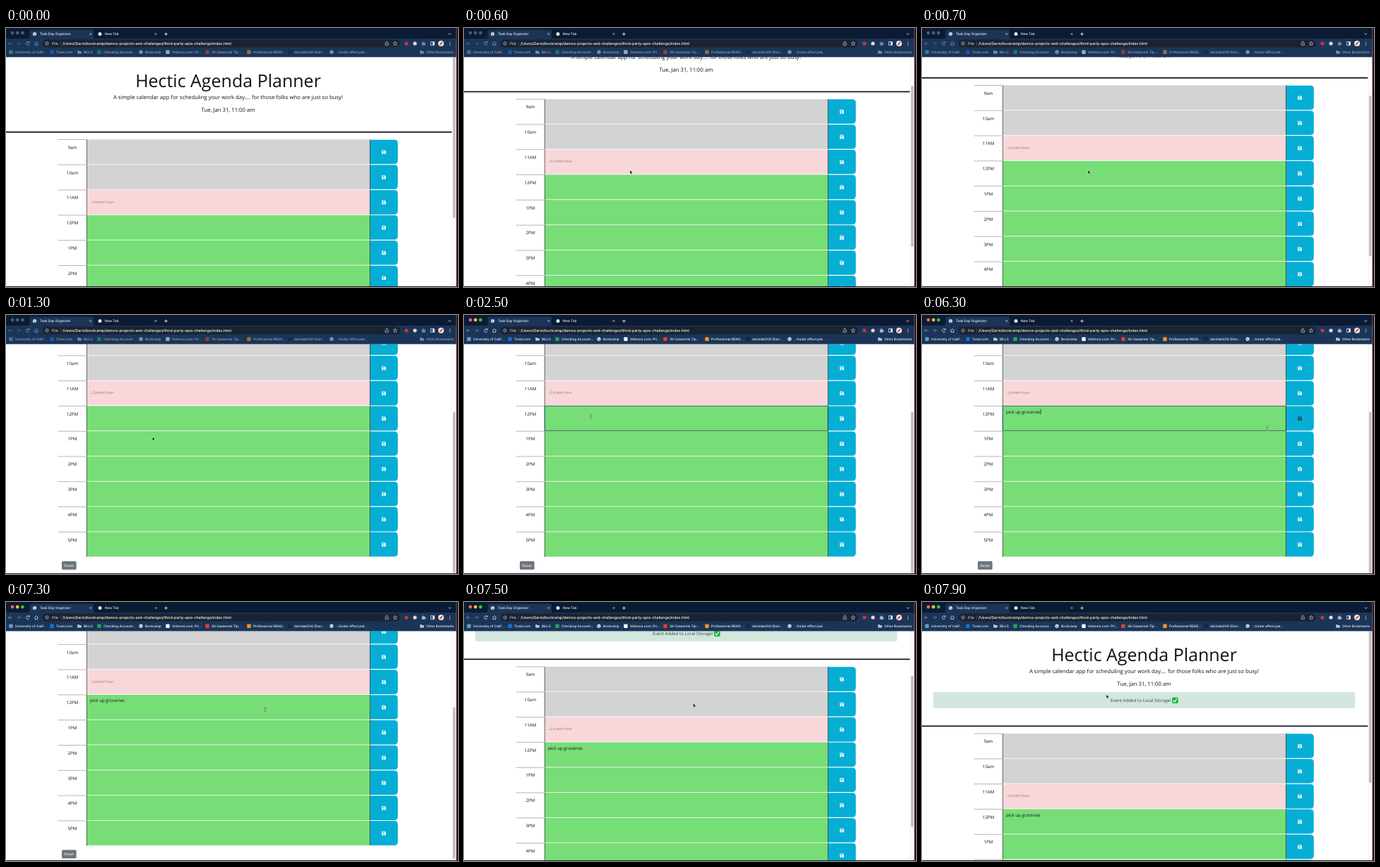
An HTML page for the animation above (8 s loop, 640 by 368 pixels).

```html
<!DOCTYPE html>
<html lang="en">
<head>
<meta charset="utf-8">
<title>Day planner</title>
<style>
  html, body { margin: 0; width: 100%; height: 100%; overflow: hidden; background: #fff; }
  svg { display: block; width: 640px; height: 368px; text-rendering: geometricPrecision; }
  .page text { font-family: "Open Sans", sans-serif; fill: #111; }
  .chrome text { font-family: Inter, Roboto, sans-serif; font-size: 4.7px; font-weight: 500; }
  .chrome .url { font-size: 5.25px; }
  .mid { text-anchor: middle; }
</style>
</head>
<body>
<svg id="stage" viewBox="0 0 640 368" xmlns="http://www.w3.org/2000/svg">
  <defs>
    <clipPath id="view"><rect y="41.3" width="637.6" height="325.7"/></clipPath>
  </defs>
</svg>
<script>
const NS = "http://www.w3.org/2000/svg";
const LOOP = 8000, VIEW_TOP = 41.5, VIEW_H = 325, MAX_SCROLL = 136.5;
const ROW_TOP = 158.2, ROW_H = 35.8, ALERT_H = 28.5;
const ACTIVATE_AT = 1800, FOCUS_AT = 2000, CLICK_AT = 6600;
const stage = document.getElementById("stage");

function add(parent, tag, attrs = {}, text) {
  const node = document.createElementNS(NS, tag);
  set(node, attrs);
  if (text !== undefined) node.textContent = text;
  return parent.appendChild(node);
}
function set(node, attrs) {
  for (const key in attrs) node.setAttribute(key, attrs[key]);
}
const show = (node, on) => set(node, { visibility: on ? "visible" : "hidden" });
const rect = (p, x, y, width, height, fill, more) =>
  add(p, "rect", { x, y, width, height, fill, ...more });
const dot = (p, cx, cy, r, fill, more) => add(p, "circle", { cx, cy, r, fill, ...more });
const shape = (p, d, fill, more) => add(p, "path", { d, fill, ...more });
const line = (p, d, stroke, width = 0.8, more) =>
  add(p, "path", { d, stroke, fill: "none", "stroke-width": width, ...more });
const label = (p, x, y, text, more) => add(p, "text", { x, y, ...more }, text);

// Page
const view = add(stage, "g", { "clip-path": "url(#view)", class: "page" });
rect(view, 0, 41, 638, 326, "#fff");
const page = add(view, "g");
label(page, 314.5, 84, "Hectic Agenda Planner", { class: "mid", "font-size": 25 });
label(page, 314.5, 101.2,
  "A simple calendar app for scheduling your work day.... for those folks who are just so busy!",
  { class: "mid", "font-size": 7.73 });
label(page, 314.5, 119, "Tue, Jan 31, 11:00 am", { class: "mid", "font-size": 7.73 });

const notice = add(page, "g");
rect(notice, 16.2, 128.4, 596.6, 22, "#d1e7dd", { stroke: "#badbcc", "stroke-width": 0.5, rx: 1.5 });
label(notice, 267, 142, "Event Added to Local Storage!", { "font-size": 6.2, style: "fill:#2b4a3c" });
rect(notice, 354.2, 135.6, 8.4, 8.4, "#17b53a", { rx: 1.4 });
line(notice, "M356 140l1.8 2 3-5", "#fff", 1.2);

const lower = add(page, "g");
rect(lower, 0, 147, 631.5, 1.7, "#111");

function saveIcon(parent, x, y) {
  const outline = "M-2.8-2.3q0-.5.5-.5H1.3L2.8-1.3V2.3q0 .5-.5.5H-2.3q-.5 0-.5-.5Z";
  const holes = "M-1.8-1.8V-.5H1V-1.8ZM0 .5a.8 .8 0 1 0 .01 0Z";
  return shape(parent, outline + holes, "#fff",
    { "fill-rule": "evenodd", transform: `translate(${x} ${y})` });
}
const hours = ["9am", "10am", "11AM", "12PM", "1PM", "2PM", "3PM", "4PM", "5PM"];
const rows = hours.map((hour, i) => {
  const row = add(lower, "g", { transform: `translate(0 ${ROW_TOP + i * ROW_H})` });
  const fill = i < 2 ? "#d3d3d3" : i === 2 ? "#f8d7da" : "#77dd77";
  line(row, "M74 .3H114", "#333", 0.6, { "stroke-dasharray": "1.2 .8" });
  label(row, 94, 13.6, hour, { class: "mid", "font-size": 6.2 });
  rect(row, 114, 0.2, 401.5, ROW_H - 0.8, fill);
  line(row, `M114.4 0V${ROW_H}`, "#333", 0.7);
  const button = shape(row, "M515.5 .5H549.8q5 0 5 5V30.1q0 5-5 5H515.5Z", "#06aed5",
    { "stroke-width": 0.6 });
  line(row, `M515.4 0V${ROW_H - 0.6}`, "#222", 0.7);
  return { row, button, icon: saveIcon(row, 535, 18) };
});
label(rows[2].row, 118.6, 18.9, "...Current hour",
  { "font-size": 5.3, "font-style": "italic", style: "fill:#94707a" });

const noon = rows[3];
const focusRing = add(noon.row, "g");
rect(focusRing, 114.5, 0.1, 400.8, ROW_H - 0.7, "none", { stroke: "#17453f", "stroke-width": 0.8 });
line(focusRing, `M113.9 0V${ROW_H - 0.6}`, "#5d9fd0", 0.7);
const entry = label(noon.row, 119, 10.6, "", { "font-size": 6.2 });
const caret = rect(noon.row, 119, 4.3, 0.6, 8, "#111");

rect(lower, 79, 486.3, 20.6, 12, "#6c757d", { rx: 1.6 });
label(lower, 89.3, 494.3, "Reset", { class: "mid", "font-size": 5.4, style: "fill:#fff" });

rect(view, 631.6, 41, 6, 326, "#fafafa");
line(view, "M631.7 41V367", "#e4e4e4", 0.4);
const thumb = rect(view, 633, 42, 3.2, 228, "#bdbdbd", { rx: 1.6 });

// Browser frame
const NAVY = "#1b3558", PALE = "#dce3ed", WHITE = "#f4f7fb";
const chrome = add(stage, "g", { class: "chrome" });
rect(chrome, 637.6, 0, 2.4, 368, "#35131f");
rect(chrome, 0, 367, 640, 1, "#1b1820");
rect(chrome, 0, 0, 637.6, 16, "#0b1b34");
rect(chrome, 0, 15, 637.6, 26.4, NAVY);
shape(chrome, "M31 15.2q2.5 0 2.5-2.5V4.6q0-2.2 2.2-2.2H121.8q2.2 0 2.2 2.2V12.7q0 2.5 2.5 2.5Z", NAVY);
const lights = ["#ff5f57", "#febc2e", "#28c840"].map((color, i) => ({
  color, node: dot(chrome, 9 + i * 7.2, 7, 2.4, color)
}));

const tools = add(chrome, "g", { fill: WHITE });
// These dim while the window is in the background
const bookmarkBar = add(chrome, "g", { fill: WHITE });
const navigation = add(chrome, "g");

function globe(parent, x, y) {
  dot(parent, x, y, 2.6, PALE);
  line(parent, `M${x - 1.8} ${y - 0.8}q1.6 0 1.8 1.4t1.6 .9`, "#43597a", 0.8);
}
function folder(parent, x, y) {
  shape(parent, `M${x - 2.8} ${y - 2.1}h2.1l.8.8h2.7v3.5h-5.6Z`, "#b9c5d6");
}
function cross(x, y) {
  line(tools, `M${x - 1.2} ${y - 1.2}l2.4 2.4m0-2.4l-2.4 2.4`, WHITE, 0.7);
}
globe(tools, 40.5, 8.5);
label(tools, 48, 10.1, "Task Day Organizer");
cross(119.7, 8.5);
dot(tools, 133, 8.5, 2.5, PALE);
label(tools, 140, 10.1, "New Tab");
cross(212, 8.5);
line(tools, "M226.5 6.2v4.8m-2.4-2.4h4.8", WHITE);
line(tools, "M626.5 7.6l1.8 1.8 1.8-1.8", WHITE);

line(navigation, "M8.5 22H3.6m2.3-2.3L3.6 22l2.3 2.3", "#8a99b0");
line(navigation, "M15.5 22h4.9m-2.3-2.3L20.4 22l-2.3 2.3", "#71829c");
line(navigation, "M32.7 20.6A2.3 2.3 0 1 0 33 23M33.2 19v2h-2", PALE);
line(navigation, "M40.3 22L43 19.6 45.7 22M41.2 21.8v2.7h3.6v-2.7", PALE);

rect(tools, 51.5, 16.6, 506.5, 10.9, "#1b2331", { rx: 5.4 });
dot(tools, 58, 22, 2.2, "none", { stroke: PALE, "stroke-width": 0.6 });
line(tools, "M58 21.7v1.4M58 20.5v.6", PALE, 0.6);
label(tools, 65, 23.9, "File", { class: "url", fill: "#c6d0de" });
line(tools, "M77.3 19.5v5", "#60718b", 0.5);
label(tools, 80, 23.9,
  "/Users/Darin/bootcamp/demos-projects-and-challenges/third-party-apis-challenge/index.html",
  { class: "url", fill: "#fff" });
line(tools, "M538 21.2h-1v3.3h4.4v-3.3h-1M539.2 23v-4m-1.2 1l1.2-1.2 1.2 1.2", PALE, 0.6);
line(tools, "M551 19.2l.8 1.9 2 .2-1.5 1.4.4 2-1.7-1-1.7 1 .4-2-1.5-1.4 2-.2Z", PALE, 0.6);

dot(tools, 567, 22, 2.6, "#d8322f");
dot(tools, 579, 22, 2.6, "#eed6d4");
shape(navigation, "M588.8 20.5h1.4q0-1.3.9-1.3t.9 1.3h1.4v1.3q1.3 0 1.3.9t-1.3.9v1.2h-4.6Z", "#a8b6c9");
rect(tools, 601.6, 19.7, 4.8, 4.6, "none", { stroke: WHITE, "stroke-width": 0.7 });
rect(tools, 604.2, 19.7, 2.2, 4.6, WHITE);
dot(tools, 616, 22, 4, "#f3eae7");
line(tools, "M614.3 24.2L617.8 19.8", "#d4503f", 2);
[-1.9, 0, 1.9].forEach(dy => dot(tools, 628.5, 22 + dy, 0.6, WHITE));

const bookmarks = [
  [7, "#5f9fc0", "University of Calif..."],
  [65, "#1c6fd0", "Toval.com"],
  [104, "folder", "BILLS"],
  [132, "#1fa463", "Checking Account..."],
  [191, "globe", "Bootcamp"],
  [229, "#f4f4f4", "Velmora.com: Pri..."],
  [285, "#e0402f", "36 Casserole Tip..."],
  [344, "#f0961e", "Professional READ..."],
  [402, "#16263f", "darinlak204 (Dari..."],
  [461, "globe", ".: Guitar effect pat..."],
  [589, "folder", "Other Bookmarks"]
];
for (const [x, icon, text] of bookmarks) {
  if (icon === "folder") folder(bookmarkBar, x, 34.2);
  else if (icon === "globe") globe(bookmarkBar, x, 34.2);
  else rect(bookmarkBar, x - 2.7, 31.5, 5.4, 5.4, icon, { rx: 0.8 });
  label(bookmarkBar, x + 6, 36, text);
}

// Pointer
const pointer = add(stage, "g");
const arrow = shape(pointer, "M0 0V5.3L1.3 4.2 2.2 6.2 3.2 5.7 2.3 3.8H4Z", "#000",
  { stroke: "#fff", "stroke-width": 0.5 });
const beam = add(pointer, "g");
const beamPath = "M-1.2-3Q0-3 0-2.2Q0-3 1.2-3M0-2.2V2.2M-1.2 3Q0 3 0 2.2Q0 3 1.2 3";
line(beam, beamPath, "#dff5df", 1.4);
line(beam, beamPath, "#222", 0.7);
const hand = shape(pointer, "M-.9-2.6q.7-.8 1.3 0V0l2.3.6q.5.3.4 1.2L2.5 4H-.8L-2.4 1.5q0-1 1.5-.2Z",
  "#111", { stroke: "#fff", "stroke-width": 0.4 });

// Timeline
const scrollKeys = [[200, 0], [400, 18], [700, 77], [900, 118], [1100, 136.5],
  [CLICK_AT - 1, 136.5], [CLICK_AT, 165], [7200, 165], [7300, 162.5],
  [7500, 95], [7700, 22], [7800, 4], [7900, 0]];
const pointerX = [[100, 330], [400, 235], [900, 235], [1700, 179.5], [5600, 179.5],
  [6000, 330], [6300, 489], [6500, 535], [6800, 535], [7300, 367], [7800, 261]];
const pointerY = [[100, 320], [400, 202], [900, 202], [1700, 144.5], [5600, 144.5],
  [6000, 160], [6300, 161], [6500, 148], [6800, 148], [7300, 152.5], [7800, 131.5]];
const phrase = "pick up groceries";
const keyTimes = [2900, 3100, 3200, 3400, 3600, 3800, 3900, 4000, 4200,
  4400, 4500, 4600, 4700, 4800, 5000, 5100, 5200];

function track(keys, t) {
  const next = keys.findIndex(key => key[0] > t);
  if (next === 0) return keys[0][1];
  if (next < 0) return keys[keys.length - 1][1];
  const [t0, a] = keys[next - 1], [t1, b] = keys[next];
  return a + (b - a) * (t - t0) / (t1 - t0);
}

function drawEntry(t, focused) {
  const count = keyTimes.filter(time => time <= t).length;
  const typed = phrase.slice(0, count);
  const lastKey = count ? keyTimes[count - 1] : FOCUS_AT;
  entry.textContent = typed.trimEnd();
  const width = (count ? entry.getComputedTextLength() : 0) + (typed.endsWith(" ") ? 1.6 : 0);
  set(caret, { x: 119 + width });
  show(caret, focused && (t - lastKey) % 1000 < 500);
}

function drawPointer(t, active) {
  const x = track(pointerX, t), y = track(pointerY, t);
  const visible = t >= 100 && (t < 2900 || t >= 5600);
  const onButton = x > 516;
  const overText = active && !onButton && t < 7500;
  set(pointer, { transform: `translate(${x} ${y})` });
  show(hand, visible && onButton);
  show(beam, visible && overText);
  show(arrow, visible && !onButton && !overText);
}

function draw(t) {
  const active = t >= ACTIVATE_AT, saved = t >= CLICK_AT;
  const focused = t >= FOCUS_AT && !saved;
  const scroll = track(scrollKeys, t);
  const content = VIEW_H + MAX_SCROLL + (saved ? ALERT_H : 0);

  set(page, { transform: `translate(0 ${-scroll})` });
  set(lower, { transform: `translate(0 ${saved ? ALERT_H : 0})` });
  show(notice, saved);
  set(thumb, { y: VIEW_TOP + scroll * VIEW_H / content, height: VIEW_H * VIEW_H / content });

  set(bookmarkBar, { opacity: active ? 1 : 0.6 });
  set(navigation, { opacity: active ? 1 : 0.6 });
  lights.forEach(({ node, color }) => set(node, { fill: active ? color : "#4a5b75" }));

  show(focusRing, focused);
  set(noon.button, { stroke: saved ? "#8fdcec" : "none" });
  set(noon.icon, { fill: t >= 6200 && t < 6900 ? "#22404a" : "#fff" });
  drawEntry(t, focused);
  drawPointer(t, active);
}

const start = performance.now();
function tick() {
  const elapsed = (performance.now() - start) % LOOP;
  draw(Math.floor(elapsed / 100) * 100);
  requestAnimationFrame(tick);
}
tick();
</script>
</body>
</html>
```
